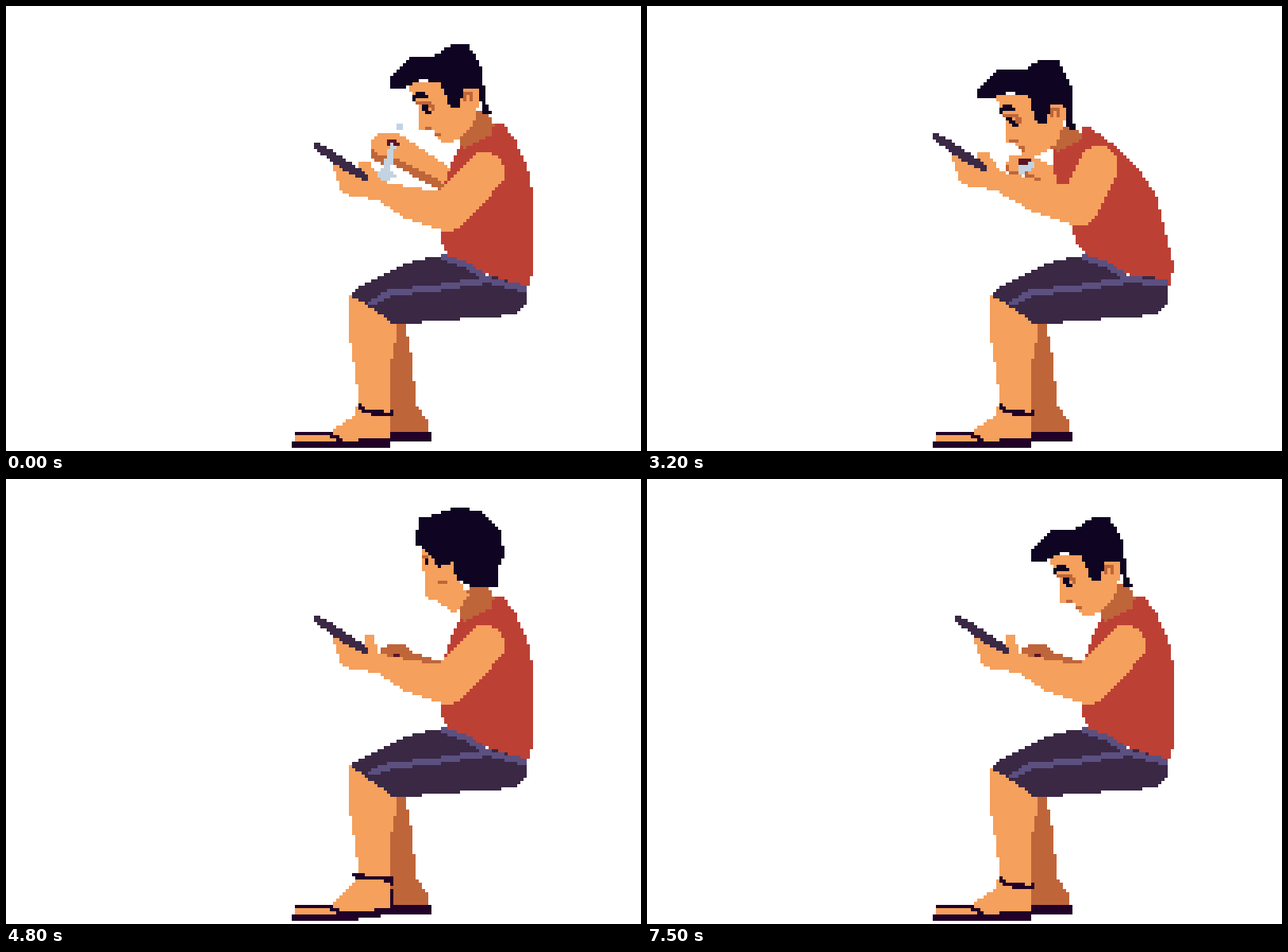
These frames come from a looping animation (800 by 560 pixels, 7.6 s). An HTML page with a canvas:

```html
<!DOCTYPE html>
<html lang="en">
<head>
<meta charset="utf-8">
<title>Seated man with a phone</title>
<style>
  html, body { margin: 0; width: 100%; height: 100%; overflow: hidden; background: #fff; }
  canvas { display: block; width: 800px; height: 560px; }
</style>
</head>
<body>
<canvas id="stage" width="800" height="560"></canvas>
<script>
const ctx = document.getElementById('stage').getContext('2d');
const LOOP = 7600, STEP = 100, CELL = 4, THIN = 2.9;
const SKIN = '#f5a05c', SHADE = '#bf653a', RED = '#bd4035', HAIR = '#0f0522',
      CLOTH = '#3a2845', TRIM = '#5b5080', SOLE = '#210127', STEEL = '#c3d3e1', LIP = '#5d1424';

const path = text => text.split(' ').map(p => p.split(',').map(Number));
const lerp = (a, b, k) => a + (b - a) * k;
const clamp = v => Math.max(0, Math.min(1, v));
const snap = v => Math.round(v / CELL) * CELL;
const mix = (a, b, k) => a.map((v, i) => Array.isArray(v) ? mix(v, b[i], k) : lerp(v, b[i], k));
const move = ([x, y, r], [dx, dy]) => [x + dx, y + dy, r];

// Hard-edged polygon on the coarse pixel grid.
function fill(points, color) {
  const ys = points.map(p => p[1]);
  ctx.fillStyle = color;
  for (let y = Math.floor(Math.min(...ys) / CELL) * CELL; y < Math.max(...ys); y += CELL) {
    const cy = y + CELL / 2, xs = [];
    points.forEach(([x1, y1], i) => {
      const [x2, y2] = points[(i + 1) % points.length];
      if ((y1 <= cy) !== (y2 <= cy)) xs.push(x1 + (cy - y1) / (y2 - y1) * (x2 - x1));
    });
    xs.sort((a, b) => a - b);
    for (let i = 0; i + 1 < xs.length; i += 2) {
      const l = snap(xs[i]), r = snap(xs[i + 1]);
      if (r > l) ctx.fillRect(l, y, r - l, CELL);
    }
  }
}

// Chain of tapered capsules through joints [x, y, radius].
function limb(joints, color) {
  ctx.fillStyle = color;
  joints.forEach(([x1, y1, r1], i) => {
    const [x2, y2, r2] = joints[i + 1] || joints[i];
    const dx = x2 - x1, dy = y2 - y1, len2 = dx * dx + dy * dy || 1, r = Math.max(r1, r2);
    for (let y = snap(Math.min(y1, y2) - r) - CELL; y < Math.max(y1, y2) + r; y += CELL)
      for (let x = snap(Math.min(x1, x2) - r) - CELL; x < Math.max(x1, x2) + r; x += CELL) {
        const cx = x + CELL / 2, cy = y + CELL / 2;
        const t = clamp(((cx - x1) * dx + (cy - y1) * dy) / len2);
        if (Math.hypot(cx - x1 - t * dx, cy - y1 - t * dy) <= lerp(r1, r2, t)) ctx.fillRect(x, y, CELL, CELL);
      }
  });
}
const line = (text, color, r = THIN) => limb(path(text).map(([x, y]) => [x, y, r]), color);

const TORSO = path('572,176 612,158 616,148 626,148 642,170 656,200 664,240 664,326 660,352 640,352 558,316 548,298 548,240 560,200');
const HAIR_SIDE = path('484,90 508,65 538,64 562,48 582,48 600,78 604,122 612,136 600,136 596,106 578,102 571,128 560,128 548,97 524,92 500,103 485,103');
const HAIR_AWAY = path('524,72 524,46 548,38 570,32 604,40 632,64 632,92 624,104 626,138 584,144 564,130 560,100 550,104 544,116 538,96 532,84 525,76');
const FACE_SIDE = path('508,98 560,90 598,104 594,126 588,152 564,171 548,172 538,158 522,156 520,124 512,116');
const FACE_AWAY = path('528,84 552,96 566,104 564,128 582,144 568,170 562,164 546,154 532,148 528,124 528,96');
const EAR = [584, 112];

// bend, head [x, y, degrees], then offsets of near hand, elbow, shoulder and far hand
const UP   = [0,  [0, 0, 0],      [0, 0],     [0, 0],    [0, 0],    [0, 0]];
const LEAN = [62, [-56, 20, 4],   [-28, -12], [-12, -7], [-34, -8], [-10, 24]];
const BENT = [74, [-92, 20, -24], [-44, -8],  [-30, 0],  [-52, -4], [-30, 32]];
const RISE = [70, [-68, 20, 4], ...LEAN.slice(2)];

function poseAt(step) {
  let joints = UP;
  if (step >= 32) joints = mix(UP, RISE, clamp((35 - step) / 3));
  else if (step >= 10) joints = BENT;
  else if (step >= 7) joints = mix(UP, LEAN, (step - 6) / 3);
  const [bend, head, hand, elbow, shoulder, far] = joints;
  const tapping = step >= 35, beat = step % 5;
  const scoop = step >= 13 && step < 30 ? (step - 20) * Math.PI / 2 : 0;
  const dip = step >= 1 && step < 5 ? 24 : 0;
  return {
    bend, head, hand, elbow, shoulder, tapping,
    far: move(far, [2 * Math.cos(scoop) - 2, 4 * Math.sin(scoop) + dip + (step === 3 || step === 4 ? 4 : 0)]),
    stooped: joints === BENT,
    scooping: bend > 50,
    turn: clamp(Math.min(step - 44, 64 - step) / 5),
    heel: tapping && beat !== 0 && beat !== 2 ? 1 : 0,
    thumbUp: tapping && beat !== 2
  };
}

// The spine curves more the further a point is above the hips.
function bent(p, [x, y]) {
  const f = clamp((350 - y) / 200) ** 2;
  return [x - p.bend * f * (1 + Math.max(0, 600 - x) / 180), y + p.bend * f / 20];
}
function onHead(p, [x, y, r]) {
  const [dx, dy, deg] = p.head, a = deg * Math.PI / 180;
  const u = x - EAR[0], v = y - EAR[1];
  return [EAR[0] + snap(dx) + u * Math.cos(a) - v * Math.sin(a),
          EAR[1] + snap(dy) + u * Math.sin(a) + v * Math.cos(a), r];
}

function legs({ heel }) {
  fill(path('484,396 502,396 512,446 516,500 532,524 532,540 484,540'), SHADE);
  line('488,542 532,542', SOLE, 5);
  fill(path(`432,${364 - 4 * heel} 460,364 492,400 492,416 484,452 484,${544 - 4 * heel} 404,548 364,548 364,540 408,536 ${438 - 6 * heel},516 444,${500 - 4 * heel} 444,490 432,410`), SKIN);
  fill(path(`360,548 400,548 484,${544 - 4 * heel} 484,${556 - 8 * heel} 432,556 360,556`), SOLE);
  line('366,538 408,538 420,545', SOLE);
  const lift = 10 * heel;
  line(`${446 - 6 * heel},${502 - lift / 2} ${450 - 6 * heel},${510 - lift} 484,${514 - lift} 486,510`, SOLE);
  if (heel) line('486,518 486,538', SOLE);
}

function shorts({ heel, scooping }) {
  const edge = scooping ? 344 : 352;
  fill(path(`460,380 434,${364 - 4 * heel} 440,355 476,337 516,320 552,314 604,338 656,${edge} 656,372 644,386 616,392 524,396 524,400 488,400`), CLOTH);
  line(`460,${374 - 4 * heel} 484,361 548,354 604,345`, TRIM, 4);
  line(`552,317 580,326 608,345 654,${edge + 4}`, TRIM, 4);
}

function farArm(p) {
  if (p.tapping) {
    limb([[480, 218, 8], [496, 216, 9], [512, 226, 7], [548, 240, 9]], SHADE);
    line('490,222 498,226', LIP);
    return;
  }
  const hand = move([482, 174, 16], p.far), elbow = [...bent(p, [556, 214]), 10];
  if (p.stooped) {
    limb([move([440, 200, 5], [p.far[0] + 30, p.far[1] - 32]), [hand[0], hand[1], 9], elbow], SHADE);
    return;
  }
  if (!p.scooping) limb([move([495, 152, 5], p.far)], STEEL);
  hand[2] -= p.bend / 25;
  const fist = [[hand[0] - 7, hand[1], hand[2] - 2], [hand[0] + 7, hand[1], hand[2] - 2], elbow];
  limb(fist.map(j => move(j, [-2, 10 - p.bend / 12])), SHADE);
  limb(fist, SKIN);
}

function spoon(p) {
  if (p.tapping) return;
  const at = text => path(text).map(j => move(j, p.far));
  const [x, y] = move([482, 174], p.far);
  if (p.scooping) {
    limb([[x + 1, y + 9 - p.bend / 25, 7], [x + 9, y + 5 - p.bend / 25, 7]], STEEL);
    limb([[x, y - 2, THIN], [x + 8, y - 3, THIN]], LIP);
  } else {
    limb(at('487,176,4 480,204,5 476,212,8 488,214,3'), STEEL);
    limb(at('482,172,2.9 486,170,2.9 492,174,2.9'), LIP);
  }
}

function neck(p) {
  const nape = path('588,130 606,134').map(j => onHead(p, j));
  const collar = path('614,150 610,164 576,180').map(j => bent(p, j));
  fill([...nape, ...collar, onHead(p, [568, 160])], SHADE);
}

function head(p) {
  const k = p.turn, place = points => points.map(j => onHead(p, j));
  const mark = (text, color, r = THIN) => limb(place(path(text).map(([x, y]) => [x, y, r])), color);
  fill(place(mix(FACE_SIDE, FACE_AWAY, k)), SKIN);
  fill(place(mix(HAIR_SIDE, HAIR_AWAY, k)), HAIR);
  if (k > 0.5) {
    mark('526,98 530,98', SHADE);
    mark('546,130 554,130', SHADE);
    mark('530,102 530,106', HAIR);
    return;
  }
  mark('518,122 534,122 538,130', SHADE);
  mark('530,154 534,154', SHADE);
  mark('542,162 546,162', SHADE);
  mark('578,118 578,110 586,110 586,118', SHADE);
  mark('514,116 520,111 530,114', HAIR, 3.5);
  mark('526,126 532,134', HAIR, 3.5);
}

function nearArm(p) {
  const hand = joints => joints.map(j => move(j, p.hand));
  const middle = mix(p.hand, p.elbow, 0.5);
  limb([...hand([[420, 200, 8], [436, 222, 17], [470, 232, 12]]), move([510, 248, 20], middle),
        move([556, 259, 25], p.elbow), move([603, 209, 25], p.shoulder)], SKIN);
  limb(hand(p.thumbUp ? [[458, 202, 6], [460, 220, 9]] : [[452, 207, 11], [464, 224, 10]]), SKIN);
  limb(hand([[393, 177, 5], [424, 198, 6], [452, 215, 5]]), CLOTH);
}

function draw(step) {
  const p = poseAt(step);
  ctx.fillStyle = '#fff';
  ctx.fillRect(0, 0, 800, 560);
  legs(p);
  farArm(p);
  fill(TORSO.map(j => bent(p, j)), RED);
  shorts(p);
  neck(p);
  head(p);
  spoon(p);
  nearArm(p);
}

const start = performance.now();
let shown = -1;
function tick() {
  const step = Math.floor(((performance.now() - start) % LOOP) / STEP);
  if (step !== shown) draw(shown = step);
  requestAnimationFrame(tick);
}
tick();
</script>
</body>
</html>
```
